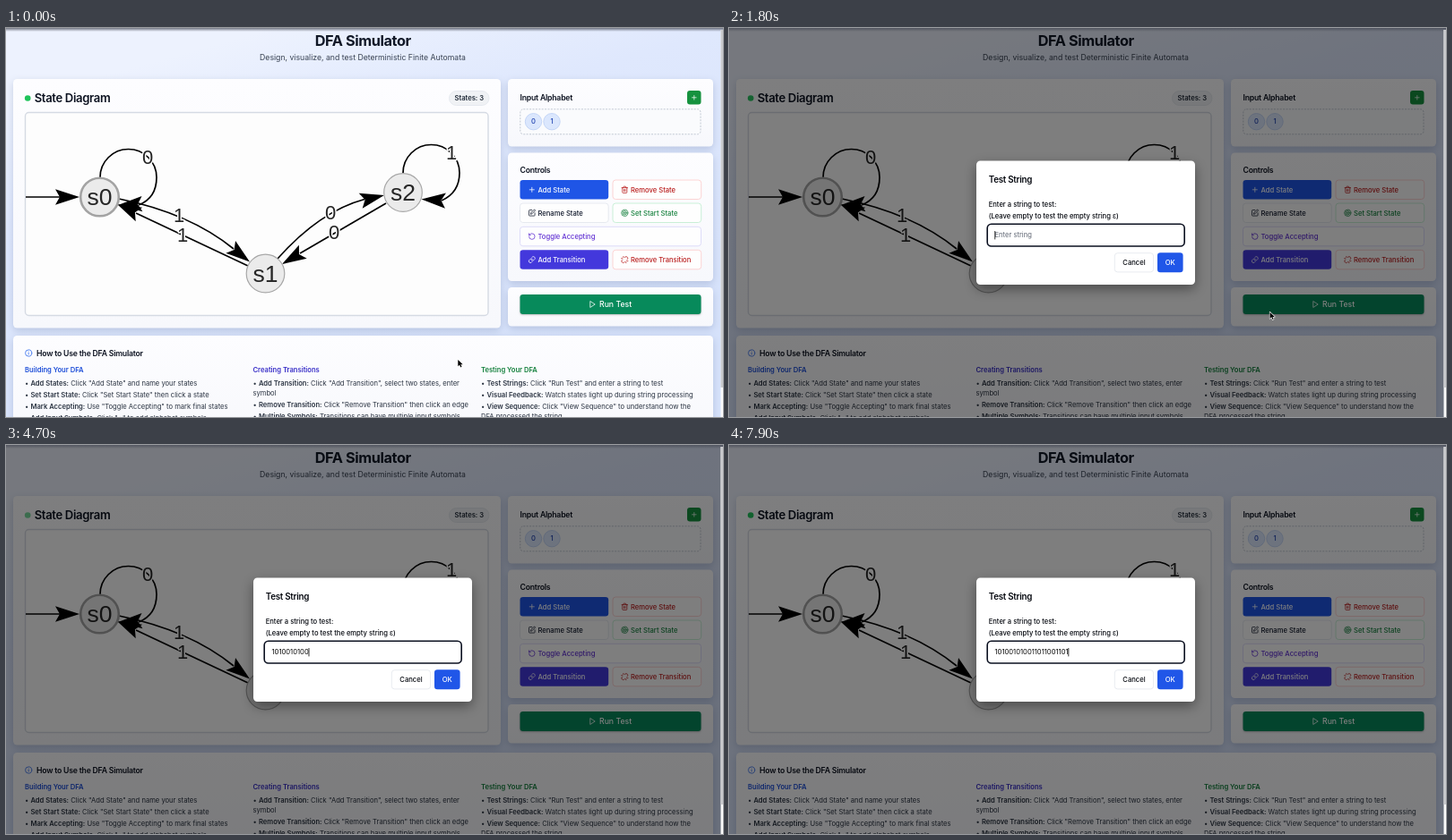
Animation of 800 by 435 pixels, one loop 8000 ms. Source, as an HTML page with a canvas:

```html
<!DOCTYPE html>
<html lang="en">
<head>
<meta charset="utf-8">
<title>DFA Simulator</title>
<style>
html, body { margin: 0; width: 100%; height: 100%; overflow: hidden; }
canvas { display: block; width: 800px; height: 435px; }
</style>
</head>
<body>
<canvas id="stage" width="800" height="435"></canvas>
<script>
const ctx = document.getElementById('stage').getContext('2d');
const LOOP = 8000, OPEN = 750, K = 800 / 1470;
const TYPED = '101001010011011001101', TYPE_START = 2130, KEY_GAP = 280;
const SANS = 'Inter, "Noto Sans", sans-serif';
const GRAPH = '"Liberation Sans", Arial, sans-serif';

const ICONS = {
  plus: 'M5 12h14M12 5v14',
  trash: 'M3 6h18M19 6v14a2 2 0 0 1-2 2H7a2 2 0 0 1-2-2V6M8 6V4a2 2 0 0 1 2-2h4a2 2 0 0 1 2 2v2M10 11v6M14 11v6',
  edit: 'M12 3H5a2 2 0 0 0-2 2v14a2 2 0 0 0 2 2h14a2 2 0 0 0 2-2v-7M18.4 2.6a2.1 2.1 0 0 1 3 3L12 15l-4 1 1-4z',
  target: 'M22 12a10 10 0 1 0-20 0a10 10 0 1 0 20 0M18 12a6 6 0 1 0-12 0a6 6 0 1 0 12 0M14 12a2 2 0 1 0-4 0a2 2 0 1 0 4 0',
  rotate: 'M3 12a9 9 0 1 0 9-9a9.7 9.7 0 0 0-6.7 2.7L3 8M3 3v5h5',
  link: 'M10 13a5 5 0 0 0 7.5.5l3-3a5 5 0 0 0-7-7l-1.7 1.7M14 11a5 5 0 0 0-7.5-.5l-3 3a5 5 0 0 0 7 7l1.7-1.7',
  unlink: 'M18.8 12.2l1.7-1.7a5 5 0 0 0-7-7l-1.7 1.7M5.2 11.8l-1.7 1.7a5 5 0 0 0 7 7l1.7-1.7M8 2v3M2 8h3M16 19v3M19 16h3',
  play: 'M6 3l14 9-14 9z',
  info: 'M22 12a10 10 0 1 0-20 0a10 10 0 1 0 20 0M12 16v-4M12 8v.1'
};

// Sizes are in page pixels; y is the middle of the capitals.
function text(str, x, y, size, weight, color, opt = {}) {
  const px = size * K;
  ctx.font = `${weight} ${px}px ${SANS}`;
  ctx.letterSpacing = opt.tight ? `${-0.025 * px}px` : '0px';
  ctx.textAlign = opt.align || 'left';
  ctx.textBaseline = 'alphabetic';
  ctx.fillStyle = color;
  ctx.fillText(str, x, y + px * 0.36);
  const w = ctx.measureText(str).width;
  ctx.letterSpacing = '0px';
  return w;
}

function box(x, y, w, h, r, fill, stroke, line = 0.8) {
  ctx.beginPath();
  ctx.roundRect(x, y, w, h, r);
  if (fill) { ctx.fillStyle = fill; ctx.fill(); }
  if (stroke) { ctx.strokeStyle = stroke; ctx.lineWidth = line; ctx.stroke(); }
}

function shadowed(blur, dy, color, draw) {
  ctx.save();
  ctx.shadowBlur = blur;
  ctx.shadowOffsetY = dy;
  ctx.shadowColor = color;
  draw();
  ctx.restore();
}

function disc(x, y, r, fill, stroke, line) {
  ctx.beginPath();
  ctx.arc(x, y, r, 0, Math.PI * 2);
  ctx.fillStyle = fill;
  ctx.fill();
  if (stroke) { ctx.strokeStyle = stroke; ctx.lineWidth = line; ctx.stroke(); }
}

function icon(name, x, y, color, size = 8.7) {
  ctx.save();
  ctx.translate(x - size / 2, y - size / 2);
  ctx.scale(size / 24, size / 24);
  ctx.strokeStyle = color;
  ctx.lineWidth = 2.1;
  ctx.lineCap = ctx.lineJoin = 'round';
  ctx.stroke(new Path2D(ICONS[name]));
  ctx.restore();
}

function card(x, y, w, h) {
  const g = ctx.createLinearGradient(0, y, 0, y + h);
  g.addColorStop(0, '#fdfdff');
  g.addColorStop(1, '#f7f8fc');
  shadowed(9, 3, 'rgba(40,60,110,.2)', () => box(x, y, w, h, 4.4, g));
}

function background() {
  const g = ctx.createLinearGradient(300, 0, 420, 435);
  g.addColorStop(0, '#edf2fe');
  g.addColorStop(0.3, '#dfe8fd');
  g.addColorStop(1, '#d6e2fb');
  ctx.fillStyle = g;
  ctx.fillRect(0, 0, 800, 435);
}

function windowEdge() {
  const g = ctx.createLinearGradient(0, 0, 0, 4);
  g.addColorStop(0, 'rgba(70,74,86,.75)');
  g.addColorStop(1, 'rgba(70,74,86,0)');
  ctx.fillStyle = g;
  ctx.fillRect(0, 0, 800, 4);
  ctx.fillStyle = '#fafafa';
  ctx.fillRect(797.5, 2, 2.5, 433);
  ctx.fillStyle = '#c8c9cc';
  ctx.fillRect(797.5, 2, 2.5, 400);
}

function head(x, y, angle, len = 27) {
  ctx.save();
  ctx.translate(x, y);
  ctx.rotate(angle);
  ctx.beginPath();
  ctx.moveTo(0, 0);
  ctx.lineTo(-len, -8.7);
  ctx.lineTo(-len + 5, 0);
  ctx.lineTo(-len, 8.7);
  ctx.closePath();
  ctx.fillStyle = '#000';
  ctx.fill();
  ctx.restore();
}

function edge(path, tipX, tipY, angle) {
  ctx.strokeStyle = '#000';
  ctx.lineWidth = 1.7;
  ctx.stroke(new Path2D(path));
  head(tipX, tipY, angle);
}

function graphText(str, x, y, px, halo) {
  ctx.font = `${px}px ${GRAPH}`;
  ctx.textAlign = 'center';
  ctx.textBaseline = 'alphabetic';
  if (halo) {
    ctx.lineJoin = 'round';
    ctx.strokeStyle = '#fff';
    ctx.lineWidth = 3;
    ctx.strokeText(str, x, y + px * 0.36);
  }
  ctx.fillStyle = '#262626';
  ctx.fillText(str, x, y + px * 0.36);
}

function node(name, x, y, line, color) {
  disc(x, y, 21.3, '#ebebeb', color, line);
  graphText(name, x, y - 0.5, 26.5);
}

function diagram() {
  box(21.5, 94.5, 516.5, 227, 4, '#fdfdfd', '#d5dae3', 1.4);
  edge('M22 189H60', 82, 189, 0);
  edge('M105 167A31.5 31.5 0 0 1 168 167Q168 190 148 198', 125, 198, Math.PI - 0.05);
  edge('M443 162A31.5 31.5 0 0 1 506 162Q506 184 486 193', 463.5, 191.5, Math.PI + 0.06);
  edge('M126 191Q205 207 254 247', 272, 261.5, 0.66);
  edge('M270 266L145 207', 124, 197, Math.PI + 0.44);
  edge('M303 258Q350 205 400 191.5', 422, 187, -0.23);
  edge('M424 196L328 252', 308, 264, Math.PI - 0.53);
  node('s0', 104.5, 189, 2.6, '#a3a3a3');
  node('s1', 289.5, 274.5, 1.2, '#a8a8a8');
  node('s2', 443, 184, 1.2, '#a8a8a8');
  [['0', 158, 144], ['1', 497, 139], ['1', 193, 209], ['1', 197, 231], ['0', 362, 206], ['0', 366, 228]]
    .forEach(([s, x, y]) => graphText(s, x, y, 22, true));
}

function button(x, y, w, name, label, fill, border, color) {
  box(x, y, w, 21.5, 3.3, fill, border);
  icon(name, x + 13.3, y + 10.8, color);
  text(label, x + 20, y + 10.8, 14, 500, color);
}

function sidebar(t) {
  card(560, 57, 229, 75.5);
  text('Input Alphabet', 573.5, 78, 16, 600, '#0c1220', { tight: true });
  box(760, 70, 15.5, 15.5, 3, '#16923f');
  icon('plus', 767.8, 77.8, '#fff', 8);
  ctx.setLineDash([2, 1.4]);
  box(573.8, 90.8, 201.2, 28, 3.5, '#fafbfd', '#bcc3ce', 0.9);
  ctx.setLineDash([]);
  [['0', 588.5], ['1', 609]].forEach(([s, x]) => {
    disc(x, 104.7, 9.2, '#dbe7fd', '#c0d3f5', 0.9);
    text(s, x, 104.7, 14, 500, '#1e40af', { align: 'center' });
  });

  card(560, 139.5, 229, 143.5);
  text('Controls', 573.5, 158.5, 16, 600, '#0c1220', { tight: true });
  const L = 573.5, R = 677, W = 98.7;
  button(L, 170, W, 'plus', 'Add State', '#1f55e6', null, '#fff');
  button(R, 170, W, 'trash', 'Remove State', '#fefefe', '#fcc9c9', '#b91c1c');
  button(L, 196, W, 'edit', 'Rename State', '#fefefe', '#e1e5ec', '#0f172a');
  button(R, 196, W, 'target', 'Set Start State', '#fefefe', '#bdeccd', '#15803d');
  button(L, 222.3, 202, 'rotate', 'Toggle Accepting', '#fefefe', '#d6d3f8', '#6232d3');
  button(L, 248.3, W, 'link', 'Add Transition', '#4338dc', null, '#fff');
  button(R, 248.3, W, 'unlink', 'Remove Transition', '#fefefe', '#fcc9c9', '#b91c1c');

  card(560, 290, 229, 43.5);
  const hover = t > 560 && t < 900;
  shadowed(2, 1, 'rgba(0,0,0,.25)', () => box(L, 298, 202, 22, 3.3, hover ? '#216b47' : '#078a5b'));
  icon('play', 654.3, 309, '#fff');
  text('Run Test', 662, 309, 16, 500, '#fff');
}

function bullet(str, x, y) {
  const cut = str.indexOf(':') + 1;
  const ink = '#2b3442';
  let at = x;
  if (cut) {
    at += text('• ', at, y, 14, 400, ink);
    at += text(str.slice(0, cut), at, y, 14, 600, ink);
  }
  text(str.slice(cut), at, y, 14, 400, ink);
}

function help() {
  card(8, 344, 781, 120);
  icon('info', 25.2, 363.5, '#2563eb');
  text('How to Use the DFA Simulator', 34, 363.5, 16, 600, '#0c1220', { tight: true });
  const columns = [
    [21, 'Building Your DFA', '#1d4ed8', [
      [397.5, 'Add States: Click "Add State" and name your states'],
      [410.5, 'Set Start State: Click "Set Start State" then click a state'],
      [423.5, 'Mark Accepting: Use "Toggle Accepting" to mark final states'],
      [436.5, 'Add Input Symbols: Click "+" to add alphabet symbols']]],
    [275.5, 'Creating Transitions', '#3a30c8', [
      [397.5, 'Add Transition: Click "Add Transition", select two states, enter'],
      [408.4, 'symbol'],
      [421.5, 'Remove Transition: Click "Remove Transition" then click an edge'],
      [434.5, 'Multiple Symbols: Transitions can have multiple input symbols']]],
    [530, 'Testing Your DFA', '#15803d', [
      [397.5, 'Test Strings: Click "Run Test" and enter a string to test'],
      [410.5, 'Visual Feedback: Watch states light up during string processing'],
      [423.5, 'View Sequence: Click "View Sequence" to understand how the'],
      [434.4, 'DFA processed the string']]]
  ];
  for (const [x, title, color, rows] of columns) {
    text(title, x, 382, 14, 600, color);
    rows.forEach(([y, s]) => bullet(s, x, y));
  }
}

function page(t) {
  background();
  text('DFA Simulator', 398.3, 14.5, 30, 700, '#111827', { tight: true, align: 'center' });
  text('Design, visualize, and test Deterministic Finite Automata', 398, 32.5, 16, 400, '#374151', { align: 'center' });
  card(8, 57, 544, 278.5);
  ctx.globalAlpha = 0.75 + 0.25 * Math.cos(t * Math.PI / 1000);
  disc(24.2, 78.5, 3.3, '#1fc35a');
  ctx.globalAlpha = 1;
  text('State Diagram', 31.7, 78.5, 24, 600, '#0c1220', { tight: true });
  box(494.5, 70.5, 44.5, 16, 8, '#f0f2f5', '#e2e6ec');
  text('States: 3', 516.8, 78.5, 14, 600, '#1f2937', { align: 'center' });
  diagram();
  sidebar(t);
  help();
}

function dialog(t) {
  ctx.fillStyle = 'rgba(0,0,0,.5)';
  ctx.fillRect(0, 0, 800, 435);
  shadowed(14, 5, 'rgba(0,0,0,.4)', () => box(276, 148.5, 244, 138.5, 4.4, '#fff'));
  text('Test String', 289.7, 169.5, 18, 600, '#05080f', { tight: true });
  text('Enter a string to test:', 289.7, 197, 14, 500, '#05080f');
  text('(Leave empty to test the empty string ε)', 289.7, 210, 14, 500, '#05080f');
  box(288.2, 219.2, 220, 24.8, 4.6, '#fff', '#0b1020', 1.6);

  const keys = Math.floor((t - TYPE_START) / KEY_GAP) + 1;
  const count = Math.max(0, Math.min(TYPED.length, keys));
  const w = count
    ? text(TYPED.slice(0, count), 296.5, 231.6, 14, 400, '#000')
    : (text('Enter string', 296.5, 231.6, 14, 400, '#5f6673'), 0);
  // The caret's blink restarts with each key.
  const since = t - (count ? TYPE_START + (count - 1) * KEY_GAP : OPEN);
  if (since % 1000 < 500) {
    ctx.fillStyle = '#000';
    ctx.fillRect(296.4 + w, 227, 0.8, 9.4);
  }

  box(430.3, 251.7, 43.3, 21.2, 3.3, '#fff', '#e2e6ec');
  text('Cancel', 452, 262.2, 14, 500, '#05080f', { align: 'center' });
  box(478, 251.3, 28.6, 22, 3.3, '#2056e8');
  text('OK', 492.3, 262.2, 14, 500, '#fff', { align: 'center' });
}

function pointer(x, y, path, scale, fill, stroke, line) {
  ctx.save();
  ctx.translate(x, y);
  ctx.scale(scale, scale);
  const p = new Path2D(path);
  ctx.lineJoin = 'round';
  ctx.strokeStyle = stroke;
  ctx.lineWidth = line;
  ctx.stroke(p);
  ctx.fillStyle = fill;
  ctx.fill(p);
  ctx.restore();
}

const ARROW = 'M0 0V12L3 9.4L5 14L7 13L5 8.7H9Z';
const HAND = 'M-1 0Q0-1 1 0V5L7 6.5Q8.5 7 8 9L6.5 13H0L-4 8Q-4 6.5-2.5 7L-1 8Z';

function cursor(t) {
  if (t >= TYPE_START) return;
  const u = Math.min(1, t / 600);
  const e = u * u * (3 - 2 * u);
  const x = 504.3 + 99.2 * e, y = 371 - 53.3 * e;
  if (t > 560 && t < OPEN) pointer(x, y, HAND, 0.62, '#fff', '#000', 2.2);
  else pointer(x, y, ARROW, 0.6, '#000', '#fff', 2);
}

function frame(now) {
  const t = now % LOOP;
  page(t);
  if (t >= OPEN) dialog(t);
  windowEdge();
  cursor(t);
}

let start;
function tick(now) {
  if (start === undefined) start = now;
  frame(now - start);
  requestAnimationFrame(tick);
}
frame(0);
requestAnimationFrame(tick);
</script>
</body>
</html>
```
